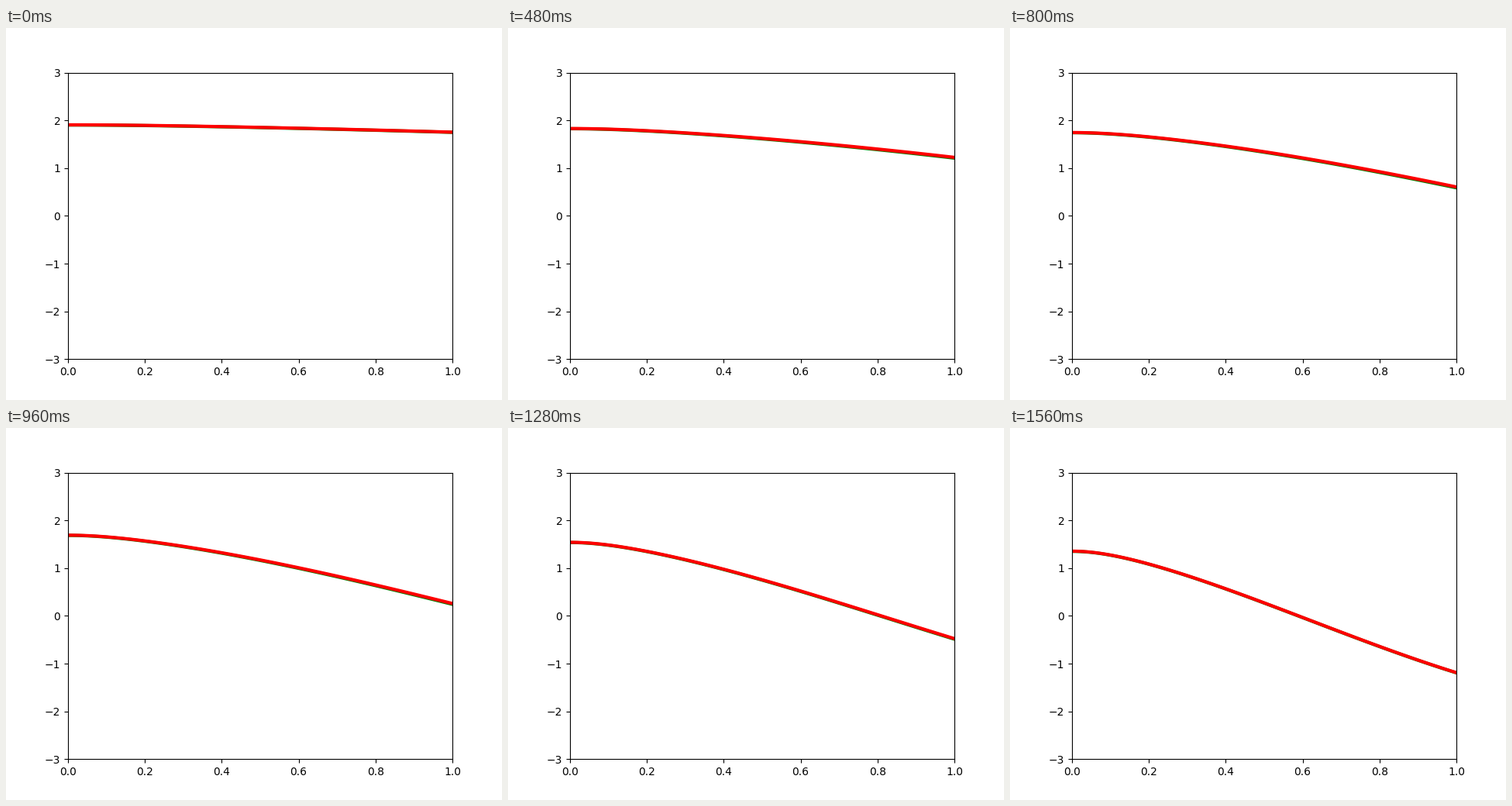
A matplotlib script for the animation above (1.58 s loop, 640 px wide and 480 px high).

```python
import matplotlib.pyplot as plt
import numpy as np
from matplotlib.animation import FuncAnimation

FRAMES = 79
INTERVAL = 20

x = np.linspace(0, 1, 101)


def bend(s, radius):
    """Hyperbola: flat at s = 0, then nearly straight."""
    return np.hypot(s, radius) - radius


def solution(t):
    """Wave 2 cos(phase); the phase grows with time and towards the right."""
    start = 0.307 * np.exp(0.99 * t)
    rise = np.polyval([1.8, -3.78, 2.724, 0.4425, 0.195], t)
    radius = 0.13 + 0.1 * (1 - t) ** 2
    return 2 * np.cos(start + rise * bend(x, radius) / bend(1, radius))


def gap(t):
    """Small error between the two curves, largest mid-way on the right."""
    return 0.004 + 0.014 * x * np.sin(np.pi * t)


fig, ax = plt.subplots(figsize=(6.4, 4.8), dpi=100)
ax.set_xlim(0, 1)
ax.set_ylim(-3, 3)
exact, = ax.plot([], [], color="g", lw=3)
approx, = ax.plot([], [], color="r", lw=3)


def update(frame):
    t = frame / (FRAMES - 1)
    u = solution(t)
    exact.set_data(x, u - gap(t))
    approx.set_data(x, u)
    return exact, approx


anim = FuncAnimation(fig, update, frames=FRAMES, interval=INTERVAL,
                     repeat=True, repeat_delay=0)
plt.show()
```
